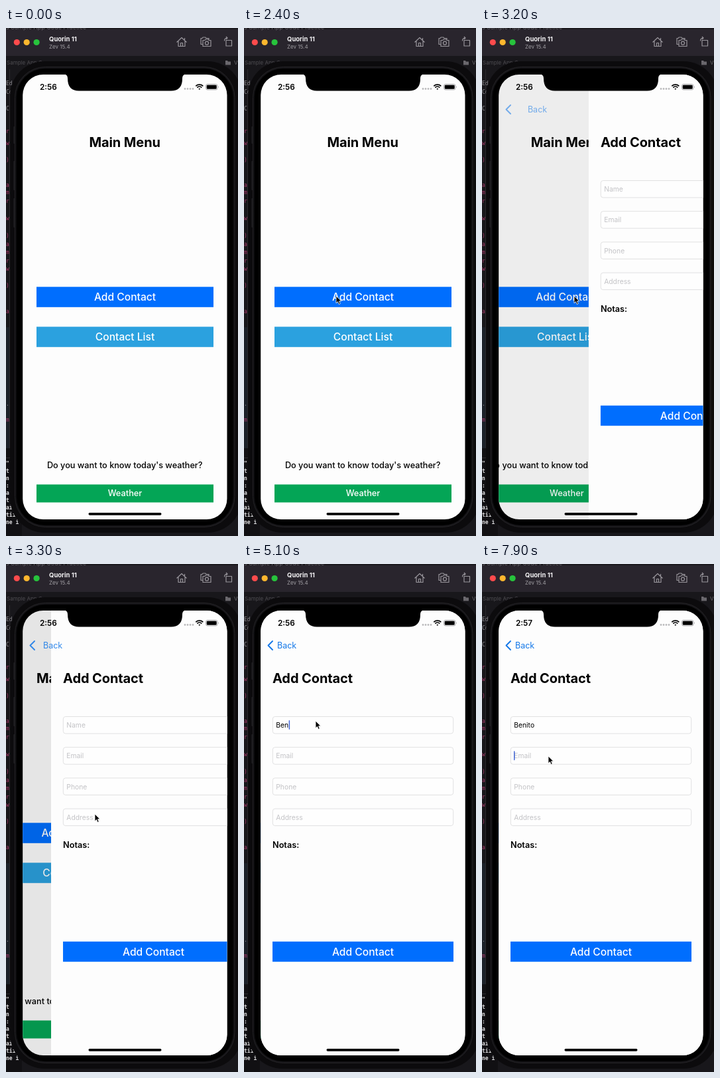
These frames come from a looping animation (350 by 764 pixels, 8000 ms). An HTML page:

```html
<!DOCTYPE html>
<html lang="en">
<head>
<meta charset="utf-8">
<title>Contacts demo</title>
<style>
html, body { margin: 0; width: 100%; height: 100%; overflow: hidden; background: #17161a; }
svg { display: block; width: 350px; height: 764px; font-family: Inter, "Open Sans", sans-serif; }
text { white-space: pre; }
.mid { text-anchor: middle; }
.title { font-size: 20px; font-weight: 700; letter-spacing: -.1px; }
.btn { font-size: 15.6px; font-weight: 500; fill: #fff; }
.body { font-size: 12.7px; font-weight: 500; }
.field { font-size: 10.3px; fill: #c3c3c6; }
.mono { font-family: "DejaVu Sans Mono", monospace; font-size: 8px; }
</style>
</head>
<body>
<svg viewBox="0 0 350 764">
  <defs>
    <clipPath id="screen"><rect x="25.200" y="70" width="308.300" height="669" rx="31"/></clipPath>
    <clipPath id="left"><rect y="62" width="24" height="702"/></clipPath>
    <linearGradient id="edge" x2="1" y2="0">
      <stop offset="0" stop-color="#0b0b0d"/><stop offset=".03" stop-color="#151417"/>
      <stop offset=".97" stop-color="#151417"/><stop offset="1" stop-color="#0b0b0d"/>
    </linearGradient>
  </defs>

  <!-- desktop -->
  <rect width="350" height="764" fill="#18171b"/>
  <rect y="450" width="8" height="182" fill="#1c2129"/>
  <rect y="632" width="24" height="132" fill="#111013"/>
  <rect y="646" width="24" height="1" fill="#2c2b2f"/>
  <rect x="5" y="62" width="1" height="570" fill="#2a292d"/>
  <g id="code" class="mono" clip-path="url(#left)"></g>
  <text x="1" y="55" font-size="8" fill="#4e4c51">Sample App Co</text>
  <path d="M331 49h3l1 1.500h4v5h-8z" fill="#6a686d"/>
  <text x="344" y="55" font-size="8" fill="#6a686d">V</text>

  <!-- phone body -->
  <rect x="6" y="50" width="350" height="709" rx="52" fill="#0c0b0d"/>
  <rect x="11" y="148" width="4" height="26" rx="1" fill="#1a191c"/>
  <rect x="11" y="200" width="4" height="44" rx="1" fill="#1a191c"/>
  <rect x="11" y="256" width="4" height="44" rx="1" fill="#1a191c"/>
  <rect x="13.500" y="58.500" width="331.500" height="692" rx="46" fill="url(#edge)" stroke="#242326"/>
  <rect x="16" y="61" width="326.500" height="687" rx="43" fill="#000"/>

  <!-- window bar -->
  <rect width="350" height="42" fill="#29252d"/>
  <rect width="350" height="2" fill="#1b191d"/>
  <text x="0" y="1.500" font-size="9" fill="#66636a">s Sample App Code Practice</text>
  <circle cx="16.300" cy="21.500" r="4.600" fill="#fe4b4c"/>
  <circle cx="31.200" cy="21.500" r="4.600" fill="#fdb72e"/>
  <circle cx="46.100" cy="21.500" r="4.600" fill="#27c33c"/>
  <text x="65" y="20" font-size="9.500" font-weight="700" fill="#f2f1f3">Quorin 11</text>
  <text x="65" y="31" font-size="8" fill="#a19fa4">Zev 15.4</text>
  <g fill="none" stroke="#98959b" stroke-width="1.200" stroke-linejoin="round">
    <path d="M257.500 21.500l7.500-7 7.500 7M260 20v7.500h10V20M263.500 27v-4.500h3V27M269.500 15v3"/>
    <path d="M296.500 24.500h-2.500v-9h2l1-1.500h4l1 1.500h4v2M297 18.500h3l1-1.500h4l1 1.500h3v9h-12z"/>
    <circle cx="303" cy="22.700" r="2.500"/>
    <path d="M332 18.500h8.500v8.500H332zM329.500 19.500q0-4.500 4.500-4.500M332 13l2 2-2 2"/>
  </g>

  <!-- app -->
  <g clip-path="url(#screen)">
    <rect x="25" y="70" width="309" height="669" fill="#fdfdfd"/>
    <g id="menu">
      <text class="title mid" x="179.200" y="179">Main Menu</text>
      <rect x="46" y="389.300" width="267" height="30.500" fill="#006efe"/>
      <text class="btn mid" x="179.500" y="410.200">Add Contact</text>
      <rect x="46" y="449.300" width="267" height="30.500" fill="#2ba1df"/>
      <text class="btn mid" x="179.500" y="470.300">Contact List</text>
      <text class="body mid" x="179.200" y="662">Do you want to know today's weather?</text>
      <rect x="46" y="686.500" width="267" height="27" fill="#04a556"/>
      <text class="btn mid" x="179.500" y="704.300" style="font-size:12.800px">Weather</text>
    </g>
    <rect id="dim" x="25" y="70" width="309" height="669"/>
    <g id="form">
      <rect x="25" y="70" width="309" height="669" fill="#fdfdfd"/>
      <text class="title" x="43" y="179">Add Contact</text>
      <g id="fields"></g>
      <text class="body" x="43" y="427" style="font-weight:600">Notas:</text>
      <rect x="43" y="567.800" width="273" height="30.400" fill="#006efe"/>
      <text class="btn mid" x="179.500" y="588.500">Add Contact</text>
      <rect id="caret" width="1.500" height="14" rx=".700" fill="#4468d8"/>
    </g>
    <g id="back" fill="#1478e8">
      <path d="M43 116l-6.500 6.500 6.500 6.500" fill="none" stroke="#1478e8" stroke-width="1.900" stroke-linecap="round" stroke-linejoin="round"/>
      <text id="backLabel" y="127" font-size="12.500">Back</text>
    </g>

    <path d="M87 69q6 1 6 7 0 18.500 17 18.500h139q17 0 17-18.500 0-6 6-7z"/>
    <text id="clock" x="51" y="93" font-size="11.800" font-weight="600"></text>
    <g fill="#bcbcbe">
      <circle cx="270" cy="91.500" r="1.400"/><circle cx="274" cy="91.500" r="1.400"/>
      <circle cx="278" cy="91.500" r="1.400"/><circle cx="282" cy="91.500" r="1.400"/>
    </g>
    <g fill="none" stroke="#000" stroke-width="1.700">
      <path d="M286.300 87.300a8 8 0 0 1 11 0M288.300 89.600a5 5 0 0 1 7 0"/>
      <path d="M291.800 93l-1.500-1.700q1.500-1.200 3 0z" fill="#000" stroke="none"/>
    </g>
    <rect x="301.500" y="84.500" width="17.500" height="8.500" rx="2.500" fill="none" stroke="#9a9a9c" stroke-width=".800"/>
    <rect x="302.700" y="85.700" width="15" height="6.100" rx="1.400"/>
    <path d="M320 87.300q1.500 1.400 0 2.900z" fill="#9a9a9c"/>
    <rect x="124.500" y="729" width="110" height="3.700" rx="1.850"/>
  </g>
  <path id="cursor" d="M0 0v10.800l2.500-2.300 1.700 4 2-.9-1.700-3.800h3.400z" stroke="#fff" stroke-width=".800" stroke-linejoin="round"/>
</svg>
<script>
const LOOP = 8000, STEP = 100, NAME = 'Benito';
const $ = id => document.getElementById(id);

// code slivers beside the phone
const sliver = (y, s, fill, weight = 400) =>
  `<text x="0" y="${y}" fill="${fill}" font-weight="${weight}">${s}</text>`;
const pinks = [158, 176, 201, 239, 250, 263, 289, 315, 328, 340, 353, 365, 390, 429, 592];
$('code').innerHTML =
  [[86, 'Ed'], [99, 'Co'], [124, 'C'], [568, '.']].map(([y, s]) => sliver(y, s, '#8b898e')).join('') +
  pinks.map((y, i) => sliver(y, 'rw)am'[i % 5], '#a93a6b')).join('') +
  ['"', 't', 'n', ':', 'a', 't', 'ai', 'tii', 'ne i'].map((s, i) => sliver(658 + i * 11, s, '#dddcde', 700)).join('');

$('fields').innerHTML = ['Name', 'Email', 'Phone', 'Address'].map((s, i) => {
  const y = 229.5 + i * 46.2;
  return `<rect x="43.300" y="${y}" width="272.400" height="25.500" rx="3.500" fill="#fefefe" stroke="#dededf" stroke-width=".900"/>
    <text class="field" x="48.300" y="${y + 16.6}">${s}</text>`;
}).join('');
const nameText = $('fields').querySelector('text');

// pointer path: time, x, y
const path = [
  [1200, 352, 560], [1500, 214, 459], [1900, 160, 419], [2300, 139, 403], [3200, 139, 403],
  [3300, 134, 376], [3600, 108, 232], [3900, 108, 236], [6200, 108, 236], [6400, 104, 266], [6800, 100, 289]
];
// key presses, then caret phases: from, to, row
const keys = [4700, 4900, 5000, 5200, 5300, 5500];
const carets = [[4200, 6000, 0], [6800, 7200, 1], [7900, 8000, 1]];

function pointer(t) {
  const i = path.findIndex(p => p[0] > t);
  if (i < 0) return path[path.length - 1].slice(1);
  if (!i) return [-40, -40];
  const a = path[i - 1], b = path[i], k = (t - a[0]) / (b[0] - a[0]);
  return [a[1] + (b[1] - a[1]) * k, a[2] + (b[2] - a[2]) * k];
}

// critically damped push; returns the share still to travel
function remaining(t) {
  const s = Math.max(0, t - 3082) * 0.0159;
  return t >= 3600 ? 0 : (1 + s) * Math.exp(-s);
}

const move = (id, x, y = 0) => $(id).setAttribute('transform', `translate(${x} ${y})`);

function draw(t) {
  const left = remaining(t), done = 1 - left;
  move('menu', -92.4 * done);
  move('form', 308.5 * left);
  $('dim').setAttribute('opacity', 0.11 * done);
  $('back').setAttribute('opacity', done);
  $('backLabel').setAttribute('x', 50 + 43 * left);

  const typed = NAME.slice(0, keys.filter(k => k <= t).length);
  nameText.textContent = typed || 'Name';
  nameText.style.fill = typed ? '#000' : '';

  const caret = carets.find(c => t >= c[0] && t < c[1]);
  $('caret').setAttribute('opacity', caret ? 1 : 0);
  if (caret) {
    const x = caret[2] || !typed ? 48 : 48.8 + nameText.getComputedTextLength();
    move('caret', x, 235 + caret[2] * 46.2);
  }

  $('clock').textContent = t < 7500 ? '2:56' : '2:57';
  move('cursor', ...pointer(t));
}

const start = performance.now();
function tick() {
  const t = (performance.now() - start) % LOOP;
  draw(Math.floor(t / STEP) * STEP);
  requestAnimationFrame(tick);
}
tick();
</script>
</body>
</html>
```
